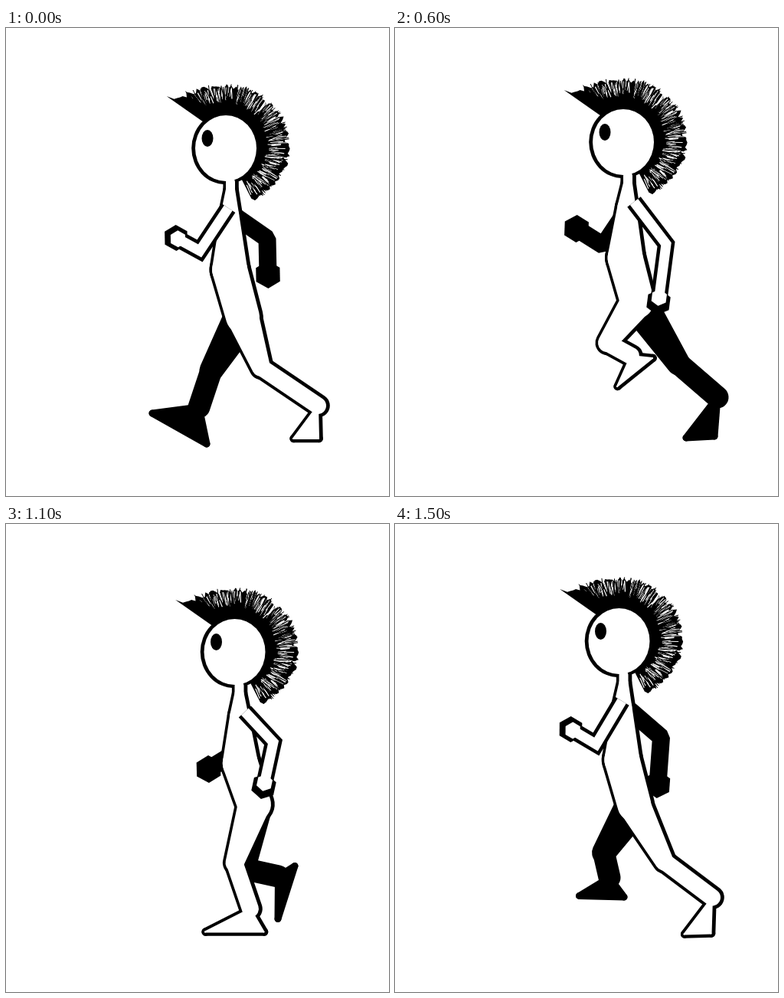
An HTML page with a canvas for the animation above (1.6 s loop, 500x611 px).

```html
<!DOCTYPE html>
<html lang="en">
<head>
<meta charset="utf-8">
<title>Mohawk runner</title>
<style>
html, body { margin: 0; width: 100%; height: 100%; overflow: hidden; background: #fff; }
canvas { display: block; }
</style>
</head>
<body>
<canvas id="stage" width="500" height="611"></canvas>
<script>
const ctx = document.getElementById('stage').getContext('2d');
const TICK = 100, STRIDE = 16;
const INK = '#000', PAPER = '#fff';

// Key points by tick. Both sides share a limb cycle, the far side half a stride later.
const LEG = {  // knee, ankle, toe, heel
  0: [[333, 443], [407, 493], [375, 536], [408, 536]],
  2: [[332, 455], [378, 460], [382, 518], [400, 447]],
  4: [[288, 445], [333, 460], [328, 513], [354, 446]],
  6: [[277, 411], [308, 428], [290, 468], [336, 431]],
  8: [[268, 447], [252, 495], [191, 503], [262, 543]],
  9: [[264, 440], [259, 497], [196, 500], [269, 530]],
  10: [[257, 452], [264, 502], [199, 533], [277, 534]],
  12: [[340, 433], [374, 503], [321, 532], [396, 531]],
  14: [[370, 438], [421, 482], [380, 535], [417, 533]]
};
const ARM = {  // elbow, hand
  0: [[253, 291], [222, 274]],
  2: [[253, 316], [220, 290]],
  4: [[338, 286], [309, 350]],
  6: [[354, 282], [344, 358]],
  8: [[341, 275], [342, 322]],
  10: [[361, 284], [368, 335]],
  12: [[337, 286], [305, 350]],
  14: [[272, 284], [237, 262]]
};
const TRUNK = {  // head, hip
  0: [[287, 157], [309, 377]],
  2: [[298, 184], [326, 372]],
  4: [[299, 150], [322, 360]],
  6: [[298, 149], [316, 357]]
};

const mix = (a, b, k) => a + (b - a) * k;
const between = (p, q, k) => [mix(p[0], q[0], k), mix(p[1], q[1], k)];
const shift = (p, dx, dy) => [p[0] + dx, p[1] + dy];
const polar = (angle, r) => [Math.cos(angle) * r, Math.sin(angle) * r];

function sample(track, tick, period) {
  const t = tick % period;
  const ticks = Object.keys(track).map(Number);
  const i = ticks.findLastIndex(key => key <= t);
  const start = ticks[i], end = ticks[i + 1] ?? period;
  const next = track[end % period];
  return track[start].map((p, n) => between(p, next[n], (t - start) / (end - start)));
}

function randomizer(seed) {
  return () => (seed = seed * 16807 % 2147483647) / 2147483647;
}

function polygon(points, color) {
  ctx.beginPath();
  points.forEach(p => ctx.lineTo(...p));
  ctx.closePath();
  ctx.fillStyle = color;
  ctx.fill();
}

function line(points, color, width) {
  ctx.beginPath();
  points.forEach(p => ctx.lineTo(...p));
  ctx.strokeStyle = color;
  ctx.lineWidth = width;
  ctx.stroke();
}

function oval([x, y], rx, ry, color) {
  ctx.beginPath();
  ctx.ellipse(x, y, rx, ry, 0, 0, Math.PI * 2);
  ctx.fillStyle = color;
  ctx.fill();
}

// Tapered limb: the hull of two circles.
function bone(a, ra, b, rb, color) {
  const dx = b[0] - a[0], dy = b[1] - a[1];
  const base = Math.atan2(dy, dx);
  const tangent = Math.acos(Math.max(-1, Math.min(1, (ra - rb) / Math.hypot(dx, dy))));
  ctx.beginPath();
  ctx.arc(...a, ra, base + tangent, base - tangent + Math.PI * 2);
  ctx.arc(...b, rb, base - tangent, base + tangent);
  ctx.closePath();
  ctx.fillStyle = color;
  ctx.fill();
}

function drawLeg(hip, [knee, ankle, toe, heel], grow, color) {
  bone(hip, 23 + grow, knee, 14 + grow, color);
  bone(knee, 13 + grow, ankle, 13 + grow, color);
  polygon([ankle, toe, heel], color);
  const rim = 3 + grow;
  bone(ankle, rim, toe, rim, color);
  bone(toe, rim, heel, rim, color);
  bone(heel, rim, ankle, rim, color);
}

function drawTrunk(neck, hip, grow, color) {
  const chest = shift(between(neck, hip, .2), -4, 0);
  const belly = shift(between(neck, hip, .63), -11, 0);
  bone(shift(neck, 0, -10), 8 + grow, neck, 8 + grow, color);
  bone(neck, 8 + grow, chest, 14 + grow, color);
  bone(chest, 14 + grow, belly, 25 + grow, color);
  bone(belly, 25 + grow, hip, 24 + grow, color);
}

function drawFist(elbow, hand, size, color) {
  const aim = Math.atan2(hand[1] - elbow[1], hand[0] - elbow[0]);
  const corners = [0, 1, 2, 3, 4, 5].map(i => {
    const [dx, dy] = polar(aim + i * Math.PI / 3, size);
    return shift(hand, dx, dy);
  });
  polygon(corners, color);
}

function drawFarArm(shoulder, [elbow, hand]) {
  ctx.lineJoin = 'bevel';
  line([shoulder, elbow, hand], INK, 23);
  drawFist(elbow, hand, 18, INK);
}

function drawNearArm(shoulder, [elbow, hand]) {
  ctx.lineJoin = 'miter';
  line([shoulder, elbow, hand], INK, 22);
  drawFist(elbow, hand, 17, INK);
  line([shoulder, elbow, hand], PAPER, 13);
  drawFist(elbow, between(hand, elbow, .08), 11, PAPER);
}

// Mohawk in polar form around the head, u running from the front spike to the nape.
const hairAngle = u => mix(-2.42, 1.1, u);
const hairReach = u => 75 + 28 * Math.exp(-u / .07) + 8 * Math.sin(Math.PI * u);

function strand(u, lean, from, to, color, width) {
  const root = polar(hairAngle(u), 44);
  const tip = polar(hairAngle(u + lean), hairReach(u));
  line([between(root, tip, from), between(root, tip, to)], color, width);
}

function drawHair([x, y]) {
  const rnd = randomizer(77);
  ctx.save();
  ctx.translate(x, y);
  ctx.beginPath();
  for (let i = 0; i <= 90; i++) {
    const u = i / 90;
    ctx.lineTo(...polar(hairAngle(u), hairReach(u) * (i ? .94 + rnd() * .1 : 1)));
  }
  for (let u = 1; u >= 0; u -= .05) ctx.lineTo(...polar(hairAngle(u), 40));
  ctx.closePath();
  ctx.fillStyle = INK;
  ctx.fill();
  for (let i = 0; i < 230; i++) {
    const u = .1 + rnd() * .89;
    const start = mix(.5, .12, u) + rnd() * .4;
    const end = Math.min(.95, start + .2 + rnd() * .25);
    strand(u, (rnd() - .5) * .07, start, end, PAPER, .7 + rnd() * .6);
  }
  for (let i = 0; i < 90; i++) {
    strand(.06 + rnd() * .94, (rnd() - .5) * .08, .3, .95 + rnd() * .12, INK, 1);
  }
  ctx.restore();
}

function draw(tick) {
  const [head, hip] = sample(TRUNK, tick, STRIDE / 2);
  const neck = shift(head, 6, 54);
  const near = tick, far = tick + STRIDE / 2;
  const nearLeg = sample(LEG, near, STRIDE), farLeg = sample(LEG, far, STRIDE);
  const nearArm = sample(ARM, near, STRIDE), farArm = sample(ARM, far, STRIDE);
  const shoulder = ([elbow], drop) => shift(neck, 2 + (elbow[0] - neck[0]) * .12, drop);

  ctx.fillStyle = PAPER;
  ctx.fillRect(0, 0, 500, 611);
  drawLeg(hip, farLeg, 1.5, INK);
  drawFarArm(shoulder(farArm, 36), farArm);
  drawHair(head);

  // One ink pass and one paper pass give the merged outline.
  for (const [grow, dx, color] of [[2.2, .6, INK], [-2, 0, PAPER]]) {
    ctx.save();
    ctx.translate(dx, 0);
    oval(shift(head, -dx * 2, 0), 42 + grow, 45 + grow, color);
    drawTrunk(neck, hip, grow, color);
    drawLeg(hip, nearLeg, grow, color);
    ctx.restore();
  }
  oval(shift(head, -24, -13), 7.5, 11, INK);
  drawNearArm(shoulder(nearArm, 24), nearArm);
}

let shown = -1;
function play(now) {
  const tick = Math.floor(now / TICK) % STRIDE;
  if (tick !== shown) draw(shown = tick);
  requestAnimationFrame(play);
}
play(performance.now());
</script>
</body>
</html>
```
